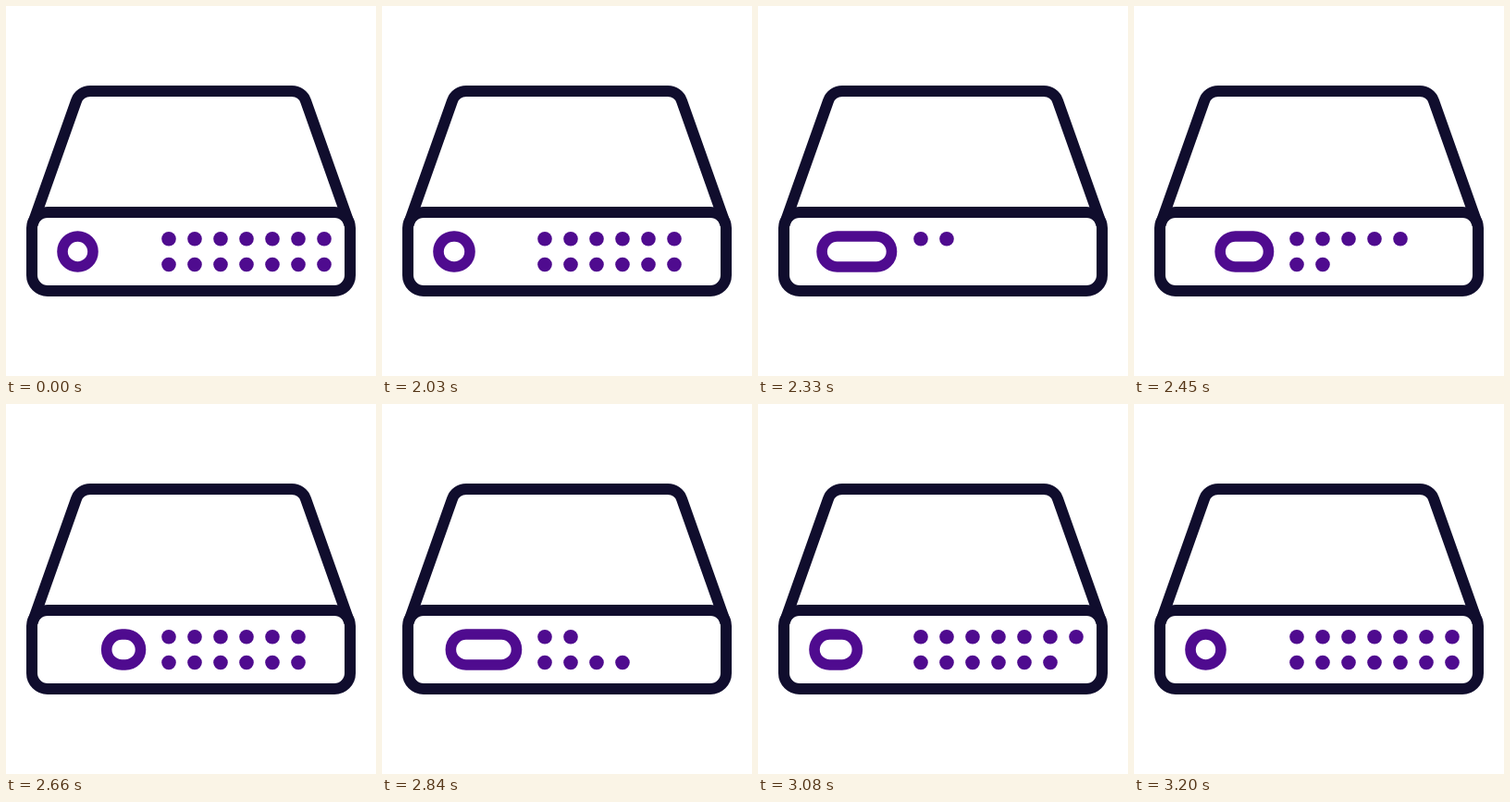
An HTML page with a canvas that plays this animation: 400x400 px, repeating every 3230 ms.

```html
<!DOCTYPE html>
<html lang="en">
<head>
<meta charset="utf-8">
<title>Server</title>
<style>
  html, body { margin: 0; width: 100%; height: 100%; overflow: hidden; background: #fff; }
  canvas { display: block; width: 400px; height: 400px; }
</style>
</head>
<body>
<canvas id="stage" width="400" height="400"></canvas>
<script>
const ctx = document.getElementById('stage').getContext('2d');
const LOOP = 3230, REST = 2000, STEP = 30;
const DARK = '#100d2d', PURPLE = '#4f0b8f';

// Lit columns per row: [ms after the rest, level]
const ROWS = [
  { y: 251.8, keys: [[0, 7], [290, 1], [510, 7], [620, 7], [840, 2], [1100, 7]] },
  { y: 279.5, keys: [[0, 7], [350, 0], [700, 7], [900, 2], [1140, 7]] }
];

function ease(t, start, duration) {
  const x = Math.min(1, Math.max(0, (t - start) / duration));
  return x * x * (3 - 2 * x);
}

function levelAt(keys, t) {
  for (let i = 1; i < keys.length; i++) {
    const [t0, a] = keys[i - 1], [t1, b] = keys[i];
    if (t <= t1) return Math.round(a + (b - a) * (t - t0) / (t1 - t0));
  }
  return keys[keys.length - 1][1];
}

function drawCase() {
  ctx.strokeStyle = DARK;
  ctx.lineWidth = 12;
  ctx.beginPath();
  ctx.moveTo(28.7, 236);
  ctx.arcTo(79.7, 92, 200, 92, 16);
  ctx.arcTo(320.3, 92, 371.3, 236, 16);
  ctx.lineTo(371.3, 236);
  ctx.stroke();
  ctx.beginPath();
  ctx.roundRect(28, 223, 344, 85, 17);
  ctx.stroke();
}

function drawSwitch(t) {
  const travel = 51.5, r = 16.5;
  const right = 77.5 + travel * (ease(t, 0, 360) - ease(t, 840, 360));
  const left = 77.5 + travel * (ease(t, 240, 360) - ease(t, 600, 360));
  ctx.strokeStyle = PURPLE;
  ctx.lineWidth = 11.6;
  ctx.beginPath();
  ctx.roundRect(left - r, 265.5 - r, right - left + 2 * r, 2 * r, r);
  ctx.stroke();
}

function drawLights(t) {
  ctx.fillStyle = PURPLE;
  for (const { y, keys } of ROWS) {
    const lit = levelAt(keys, t);
    for (let i = 0; i < lit; i++) {
      ctx.beginPath();
      ctx.arc(176 + 28 * i, y, 7.8, 0, Math.PI * 2);
      ctx.fill();
    }
  }
}

const startTime = performance.now();

function frame() {
  const elapsed = (performance.now() - startTime) % LOOP;
  const t = Math.max(0, Math.floor((elapsed - REST) / STEP) * STEP);
  ctx.fillStyle = '#fff';
  ctx.fillRect(0, 0, 400, 400);
  drawCase();
  drawSwitch(t);
  drawLights(t);
  requestAnimationFrame(frame);
}
frame();
</script>
</body>
</html>
```
